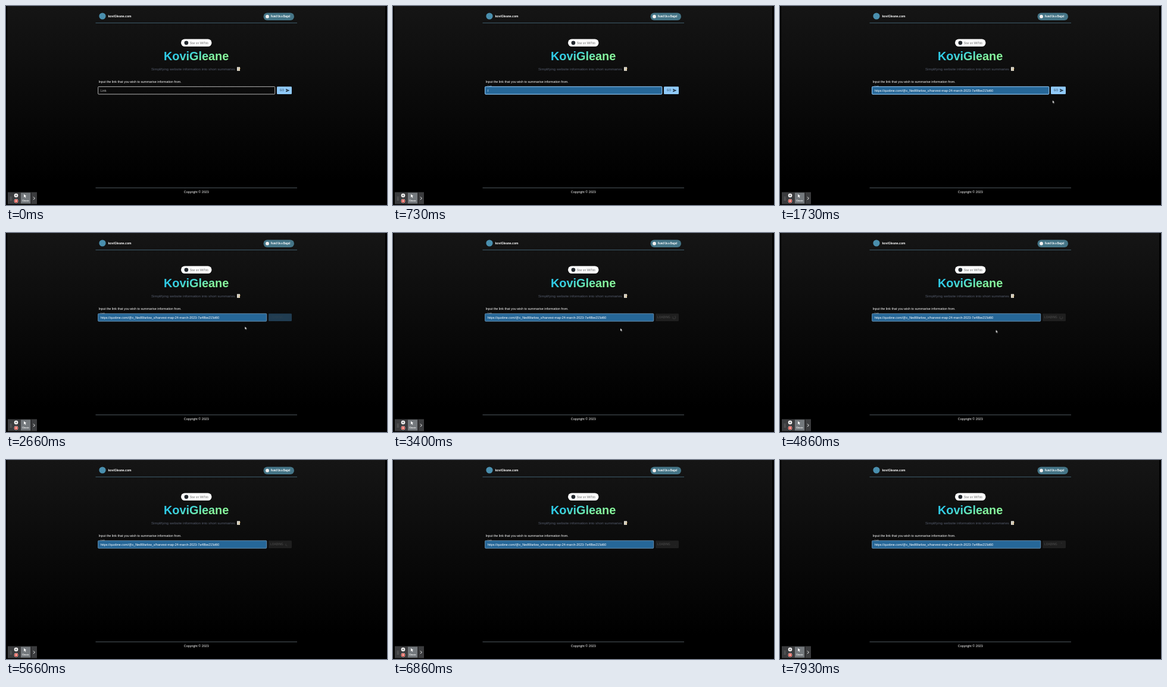
These frames come from a looping animation (640 by 334 pixels, 8000 ms). An HTML page:

```html
<!DOCTYPE html>
<html lang="en">
<head>
<meta charset="utf-8">
<title>KoviGleane</title>
<style>
html, body { margin: 0; width: 100%; height: 100%; overflow: hidden; background: #000; }
svg { display: block; width: 100vw; height: 100vh; font: 5.4px "Liberation Sans", Arial, sans-serif; }
svg * { animation-duration: 8s; animation-iteration-count: infinite; animation-timing-function: linear; }

.label { animation-name: label; transform: translate(158.7px, 143.6px); }
.fill { animation-name: fill; }
.typed { animation-name: typed; }
.url { animation-name: url; }
.idle { animation-name: idle; }
.busy { animation-name: busy; }
.frame { animation-name: frame; }
.button { animation-name: button; }
.loading { animation-name: loading; }
.spin { animation-name: spin; transform-origin: 472.3px 141.8px; }
.arc { animation-name: arc; }
.pointer { animation-name: pointer; }

@keyframes label {
  0%, .75% { transform: translate(158.7px, 143.6px); fill: #b8b8b8; animation-timing-function: cubic-bezier(0, 0, .2, 1); }
  3.25%, 31.99% { transform: translate(158.7px, 136.2px) scale(.75); fill: #90caf9; }
  32%, 100% { transform: translate(158.7px, 136.2px) scale(.75); fill: #9aa7b2; }
}
@keyframes fill { 0%, 7.49% { opacity: 0; } 7.5%, 100% { opacity: 1; } }
@keyframes typed { 0%, 6.59% { opacity: 0; } 6.6%, 10.74% { opacity: 1; } 10.75%, 100% { opacity: 0; } }
@keyframes url { 0%, 10.74% { opacity: 0; } 10.75%, 100% { opacity: 1; } }
@keyframes idle { 0%, 31.99% { opacity: 1; } 32%, 100% { opacity: 0; } }
@keyframes busy { 0%, 31.99% { opacity: 0; } 32%, 100% { opacity: 1; } }
@keyframes frame {
  0%, .75% { width: 297px; stroke: #c4c4c4; }
  2%, 31.99% { width: 297px; stroke: #90caf9; }
  32%, 100% { width: 283px; stroke: #5f86a5; }
}
@keyframes button {
  0%, 31.99% { x: 455px; width: 25px; fill: #90caf9; }
  32% { x: 441px; width: 39px; fill: #90caf9; }
  33.25% { fill: #203c51; }
  35.1%, 100% { x: 441px; width: 39px; fill: #1f1f1f; }
}
@keyframes loading { 0%, 32.5% { opacity: 0; } 35.1%, 100% { opacity: 1; } }
@keyframes spin { 0%, 32% { transform: rotate(0deg); } 100% { transform: rotate(1398.9deg); } }
@keyframes arc {
  0%, 32%, 49.5%, 67%, 84.5% { stroke-dasharray: 1 200; stroke-dashoffset: 0; animation-timing-function: ease-in-out; }
  40.75%, 58.25%, 75.75%, 93.25% { stroke-dasharray: 100 200; stroke-dashoffset: -15; animation-timing-function: ease-in-out; }
  49.49%, 66.99%, 84.49% { stroke-dasharray: 100 200; stroke-dashoffset: -125; }
  100% { stroke-dasharray: 100 200; stroke-dashoffset: -112; }
}
@keyframes pointer {
  0%, 12.49% { opacity: 0; transform: translate(300px, 160px); }
  12.5% { opacity: 1; transform: translate(300px, 160px); animation-timing-function: ease-out; }
  21%, 22% { transform: translate(457.8px, 158.3px); }
  25%, 31.2% { transform: translate(467px, 144px); }
  33.1%, 35% { transform: translate(401.3px, 157px); }
  50%, 68.99% { opacity: 1; transform: translate(362.6px, 162.6px); }
  69%, 100% { opacity: 0; transform: translate(362.6px, 162.6px); }
}
</style>
</head>
<body>
<svg viewBox="0 0 640 334" preserveAspectRatio="none">
  <defs>
    <linearGradient id="night" x2="0" y2="1">
      <stop stop-color="#151515"/><stop offset=".88" stop-color="#000"/>
    </linearGradient>
    <linearGradient id="mint" gradientUnits="userSpaceOnUse" x1="312" y1="74" x2="320" y2="96">
      <stop stop-color="#2fcbe6"/><stop offset="1" stop-color="#86f79c"/>
    </linearGradient>
  </defs>

  <rect width="640" height="334"/>
  <rect x="2" width="635" height="334" fill="url(#night)"/>

  <!-- header -->
  <circle cx="162" cy="17" r="5.6" fill="#4a8fae"/>
  <text x="171.5" y="18.6" font-size="5.1" font-weight="700" fill="#fff">koviGleane.com</text>
  <rect x="432.5" y="11.5" width="51.5" height="12.5" rx="6.2" fill="#457587"/>
  <circle cx="439" cy="17.7" r="2.9" fill="#f4f1f0"/>
  <text x="444.8" y="19.2" font-size="4.2" font-weight="700" fill="#fff" font-family="Inter, sans-serif">Fund Us a Bagel</text>
  <path d="M150.5 28.4H489" stroke="#4c7286" stroke-width=".8"/>

  <!-- hero -->
  <rect x="294" y="55.5" width="51.5" height="12.6" rx="6.3" fill="#fff"/>
  <circle cx="302.9" cy="61.8" r="3.4" fill="#24292f"/>
  <text x="308.7" y="63.5" font-size="4.8" fill="#6b6b6b">Star on WilTob</text>
  <text x="319.6" y="91.3" font-size="19.9" font-weight="700" text-anchor="middle" fill="url(#mint)">KoviGleane</text>
  <text x="244" y="107.8" font-size="6.05" fill="#535a6b">Simplifying website information into short summaries</text>
  <g>
    <rect x="388" y="102.5" width="5" height="6.3" fill="#eee9dc"/>
    <path d="M389 104.2h3M389 105.6h2.4M389 107h1.8" stroke="#8a8a86" stroke-width=".5"/>
    <path d="M391 107.6L393.6 104.4" stroke="#d9a441" stroke-width=".9"/>
  </g>

  <!-- form -->
  <text x="155.4" y="129.4" fill="#fff">Input the link that you wish to summarise information from.</text>
  <rect class="frame" x="154.7" y="135.4" width="297" height="12.6" rx="1" fill="none" stroke="#c4c4c4" stroke-width=".9"/>
  <rect class="fill frame" x="154.7" y="135.4" width="297" height="12.6" rx="1" fill="#266798" stroke-width=".9" style="animation-name:fill,frame"/>
  <text class="label" fill="#b8b8b8">Link</text>
  <text class="typed" x="158.7" y="143.6" fill="#fff" font-style="italic">I</text>
  <text class="url" x="158.7" y="143.6" fill="#fff">https://quobne.com/@x_NedWarlow_x/harvest-map-24-march-2023-7a48be215d60</text>

  <rect class="button" x="455" y="135.2" width="25" height="12.8" rx="1.3" fill="#90caf9"/>
  <g class="idle">
    <text x="459.8" y="143.2" font-size="4.67" letter-spacing=".1" fill="#24394a">GO</text>
    <path transform="translate(469.7 138.2) scale(.29)" d="M2 21 23 12 2 3v7l15 2-15 2z" fill="#13202b"/>
  </g>
  <g class="busy">
    <g class="loading">
      <text x="444" y="143.2" font-size="4.67" letter-spacing=".13" fill="#555">LOADING</text>
      <g class="spin">
        <circle class="arc" transform="translate(472.3 141.8) scale(.121)" r="20.2" fill="none" stroke="#5a5a5a" stroke-width="4"/>
      </g>
    </g>
  </g>

  <!-- footer -->
  <path d="M150.5 305.2H489" stroke="#66737c" stroke-width=".8"/>
  <text x="319.8" y="313.9" text-anchor="middle" fill="#fff">Copyright © 2023</text>

  <!-- recorder bar -->
  <rect x="3" y="312.5" width="49" height="20" fill="#3b3c3e"/>
  <path d="M7.3 320.5v6M9.2 320.5v6" stroke="#a0a0a0" stroke-width=".9" stroke-dasharray=".9 1.5"/>
  <circle cx="17" cy="318" r="3.3" fill="#fff"/>
  <path d="M16.2 316.6v2.8M17.8 316.6v2.8" stroke="#333" stroke-width=".8"/>
  <circle cx="17" cy="327.3" r="3.3" fill="#fff"/>
  <circle cx="17" cy="327.3" r="2.8" fill="#d8392f"/>
  <rect x="15.9" y="326.2" width="2.2" height="2.2" fill="#fff"/>
  <rect x="25" y="313.5" width="16" height="18" fill="#74797d"/>
  <path d="M30 316l4.2 3-1.9.4 1.2 2-.9.5-1.1-2-1.3 1.3z" fill="#fff"/>
  <text x="33" y="328.3" font-size="3.3" font-weight="700" text-anchor="middle" fill="#fff">Classic</text>
  <path d="M42.4 312.5v20" stroke="#1c1c1c" stroke-width=".8"/>
  <path d="M46 320.4l2.3 2.4-2.3 2.4" fill="none" stroke="#fff" stroke-width="1"/>

  <path class="pointer" d="M0 0v4.8l1.1-1 .8 1.8.9-.4-.8-1.7h1.5z" fill="#fff" stroke="#111" stroke-width=".3"/>
</svg>
</body>
</html>
```
